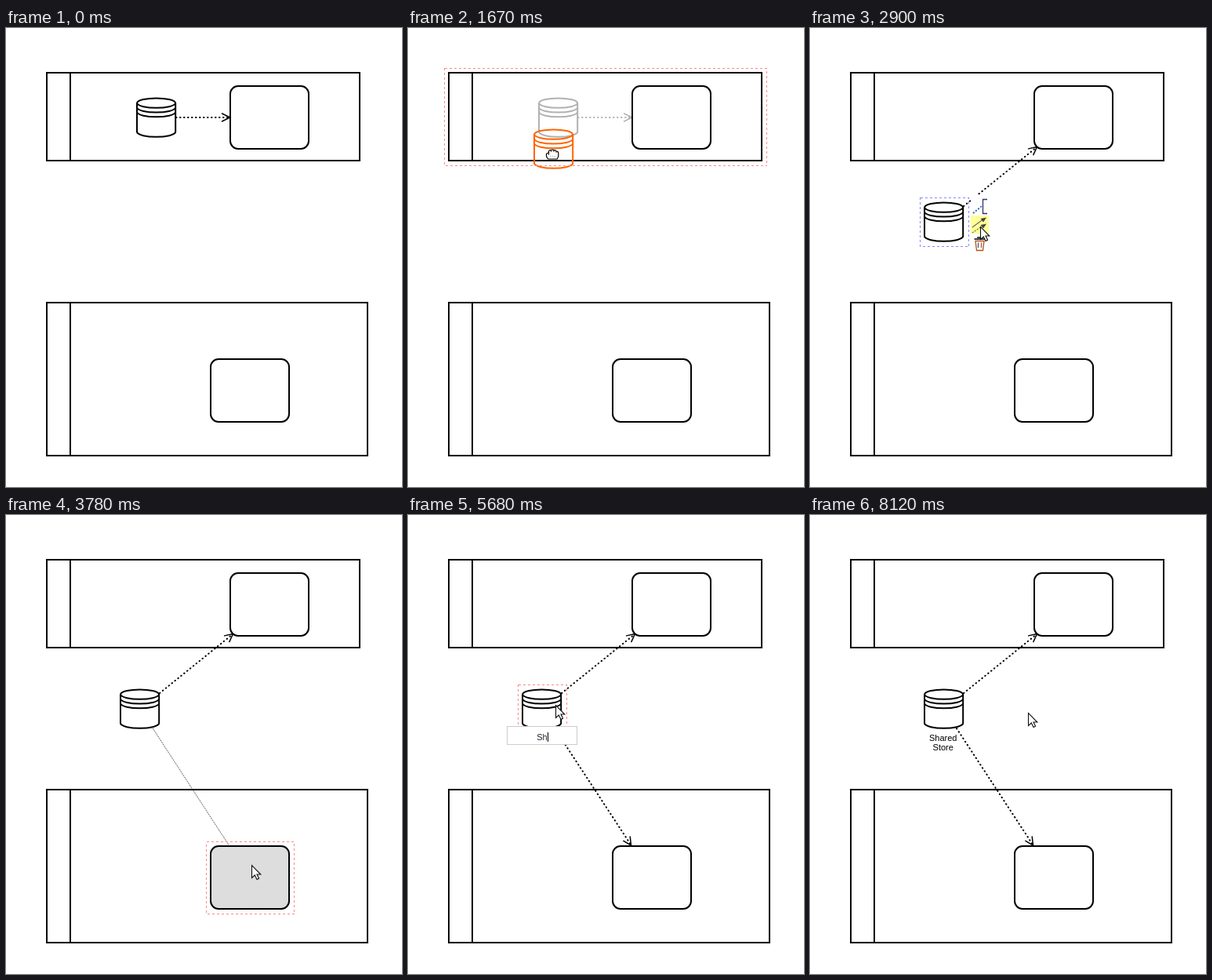
Animation, 505 px wide and 585 px high, one loop 9730 ms. Source, as an HTML page:

```html
<!DOCTYPE html>
<html lang="en">
<head>
<meta charset="utf-8">
<title>Shared data store</title>
<style>
  html, body { margin: 0; width: 100%; height: 100%; overflow: hidden; background: #fff; }
  svg { display: block; width: 505px; height: 585px; }
  .shape { fill: #fff; stroke: #000; stroke-width: 2; }
  .ok { fill: #ddd; }
  .flow { fill: none; stroke: #000; stroke-width: 2; stroke-linecap: round; stroke-dasharray: .5 4.5; }
  .head { fill: none; stroke: #000; stroke-width: 1.5; stroke-linecap: round; stroke-linejoin: round; }
  .outline { fill: none; stroke: #88f; stroke-dasharray: 3 3; shape-rendering: crispEdges; }
  .hover { stroke: #f88; }
  .ghost { opacity: .3; }
  .drag { fill: none; stroke: #ff6400; }
  .preview { stroke: #222; stroke-width: 1; stroke-dasharray: 1 1; }
  .icon { fill: none; stroke: #333; stroke-width: 1.3; }
  text { font: 11px "Liberation Sans", Arial, sans-serif; text-anchor: middle; fill: #000; }
  #editor text { fill: #223; }
</style>
</head>
<body>
<svg viewBox="0 0 505 585">
  <defs>
    <path id="storePath" d="M0 6.65v36.9c1.64 8.2 47.54 8.2 49.18 0v-36.9c-1.64-8.2-47.54-8.2-49.18 0c1.64 8.2 47.54 8.2 49.18 0m-49.18 5.74c1.64 8.2 47.54 8.2 49.18 0m-49.18 5.74c1.64 8.2 47.54 8.2 49.18 0"/>
    <path id="headPath" d="M-10-5L0 0L-10 5"/>
    <g id="note" class="icon">
      <path d="M21 2.5H15.500V20.500H21" stroke="#336"/>
      <path d="M3 20L14 11" stroke="#1565b0" stroke-width="1.8" stroke-dasharray="2 2"/>
    </g>
    <g id="connect" class="icon">
      <path d="M2 15L17 4" stroke-width="1"/>
      <path d="M2 22L17 12" stroke-width="1" stroke-dasharray="2 1.500"/>
      <path d="M20 2.500L12.500 4L16 8.500ZM20 10.500L12.500 12L16 16.500Z" fill="#444" stroke="none"/>
    </g>
    <g id="trash" class="icon">
      <path d="M4.500 7H18.500M9 6V5H14V6" stroke="#444" stroke-width="1.800"/>
      <path d="M6 9.500L7.500 21.500H15.500L17 9.500Z" stroke="#b5531c"/>
      <path d="M9.500 11.500V18" stroke="#27609c"/><path d="M13.500 11.500V18" stroke="#c4561c"/>
    </g>
    <circle id="event" class="icon" cx="11.5" cy="11.5" r="8"/>
    <path id="gateway" class="icon" d="M11.500 2L21 11.500L11.500 21L2 11.500Z"/>
    <rect id="box" class="icon" x="2.5" y="4.500" width="18" height="14" rx="3"/>
  </defs>

  <g class="shape">
    <rect x="52" y="57" width="399" height="112"/><path d="M82 57V169"/>
    <rect x="52" y="350" width="409" height="195"/><path d="M82 350V545"/>
    <rect x="286" y="74" width="100" height="80" rx="10"/>
    <rect id="task" x="261" y="422" width="100" height="80" rx="10"/>
  </g>

  <g id="before">
    <use href="#storePath" class="shape" x="167" y="89"/>
    <path class="flow" d="M217 114H285"/>
    <use href="#headPath" class="head" transform="translate(285.5 114)"/>
  </g>
  <g id="after">
    <use href="#storePath" class="shape" x="146" y="222"/>
    <path class="flow" d="M196 227L289 152"/>
    <use href="#headPath" class="head" transform="translate(289.5 151.500) rotate(-38.900)"/>
  </g>
  <g id="link">
    <path class="flow" d="M187 272L284 420"/>
    <use href="#headPath" class="head" transform="translate(284.500 421) rotate(56.800)"/>
  </g>
  <line id="preview" class="preview"/>
  <use id="dragger" href="#storePath" class="shape drag"/>
  <g id="label"><text x="169.700" y="288">Shared</text><text x="169.700" y="300">Store</text></g>

  <rect id="selected" class="outline"/>
  <rect id="hovered" class="outline hover"/>

  <g id="storePad">
    <path d="M205 213H228V285H205Z" fill="#fff"/>
    <rect id="glow" x="205" width="23" height="23" fill="#ff9"/>
    <use href="#note" x="205" y="216"/>
    <use href="#connect" x="205" y="239"/>
    <use href="#trash" x="205" y="262"/>
  </g>
  <g id="taskPad">
    <use href="#event" x="370" y="416"/><use href="#gateway" x="393" y="416"/><use href="#box" x="416" y="416"/>
    <use href="#event" x="370" y="439"/><use href="#note" x="393" y="439"/><use href="#connect" x="416" y="439"/>
    <use href="#trash" x="370" y="462"/>
  </g>

  <g id="editor">
    <rect id="field" x="126.500" y="269.500" width="89" fill="#fff" stroke="#ccc"/>
    <text id="line0" x="171" y="287"></text>
    <text id="line1" x="171" y="300"></text>
    <rect id="caret" width="1" height="12"/>
  </g>

  <path id="arrow" d="M.5 .5V16.500L4.300 13L7 18.500L9.600 17.300L7 12H11.800Z" fill="#fff" stroke="#111" stroke-width="1.100"/>
  <g id="hand" fill="#fff" stroke="#000" stroke-width="1.200">
    <path d="M-5 6Q-8 4-7.500 0Q-7-2-4.500-1.500V-4Q-3.500-6-1.500-5Q0-7 2-5Q4-6 5-4Q8-4 7.800-1V2Q7.500 4.500 6 6Z"/>
    <path d="M-1.500-5V-3M2-5V-3M5-4V-2M-4.500-1V1" stroke-width=".8"/>
    <path d="M-3 2.500H5" stroke="#888" stroke-width=".8" stroke-dasharray="1 1.500"/>
  </g>
</svg>
<script>
const LOOP = 9730;
const $ = id => document.getElementById(id);
const show = (id, on) => { $(id).style.display = on ? "" : "none"; };
const set = (id, attrs) => { for (const k in attrs) $(id).setAttribute(k, attrs[k]); };

const store0 = { x: 167, y: 89, w: 50, h: 50 };
const store1 = { x: 146, y: 222, w: 50, h: 50 };
const task0 = { x: 286, y: 74, w: 100, h: 80 };
const task1 = { x: 261, y: 422, w: 100, h: 80 };
const pool0 = { x: 52, y: 57, w: 399, h: 112 };
const pool1 = { x: 52, y: 350, w: 409, h: 195 };

// Cursor moves: start, end, number of steps, points as [progress, x, y]
const moves = [
  [660, 1420, 19, [[0, 321, 287], [.632, 203, 148], [1, 190, 121]]],
  [1590, 1950, 10, [[0, 190, 121], [1, 169, 254]]],
  [2220, 2900, 17, [[0, 169, 254], [.4, 192, 278], [.8, 219, 266], [1, 217, 253]]],
  [3260, 4100, 20, [[0, 217, 253], [.6, 313, 446], [.65, 313, 446], [1, 188, 242]]],
  [8000, 8120, 4, [[0, 188, 242], [1, 278, 252]]]
];

const typing = [
  [5100, "S"], [5680, "Sh"], [5830, "Sha"], [5900, "Shar"], [6040, "Share"], [6190, "Shared"],
  [6410, "Shared\n"], [6630, "Shared\nS"], [6710, "Shared\nSt"],
  [6930, "Shared\nSto"], [7020, "Shared\nStor"], [7110, "Shared\nStore"]
];

function cursorAt(t) {
  const move = moves.filter(m => t >= m[0]).pop();
  if (!move) return { x: 321, y: 287 };
  const [a, b, n, pts] = move;
  const p = t >= b ? 1 : (Math.floor((t - a) / (b - a) * (n - 1)) + 1) / n;
  const i = Math.max(1, pts.findIndex(q => q[0] >= p));
  const [p0, x0, y0] = pts[i - 1], [p1, x1, y1] = pts[i];
  const f = (p - p0) / (p1 - p0);
  return { x: Math.round(x0 + (x1 - x0) * f), y: Math.round(y0 + (y1 - y0) * f) };
}

const inside = (c, r) => c.x >= r.x && c.x <= r.x + r.w && c.y >= r.y && c.y <= r.y + r.h;
const center = r => ({ x: r.x + r.w / 2, y: r.y + r.h / 2 });

function outline(id, r) {
  show(id, r);
  if (r) set(id, { x: r.x - 5.5, y: r.y - 5.5, width: r.w + 12, height: r.h + 12 });
}

// Point where the ray from the middle of r towards p leaves r
function edge(r, p) {
  const c = center(r), dx = p.x - c.x, dy = p.y - c.y;
  const k = Math.min(r.w / 2 / Math.abs(dx || 1e-6), r.h / 2 / Math.abs(dy || 1e-6));
  return { x: c.x + dx * k, y: c.y + dy * k };
}

function drawEditor(t) {
  const key = typing.filter(k => t >= k[0]).pop();
  const lines = (key ? key[1] : "").split("\n");
  const last = lines.length - 1;
  $("line0").textContent = lines[0];
  $("line1").textContent = lines[1] || "";
  set("field", { height: last ? 36 : key ? 23 : 22 });
  const width = lines[last] ? $("line" + last).getComputedTextLength() : 0;
  set("caret", { x: Math.round(171 + width / 2), y: 277 + 13 * last });
  show("caret", t >= 4590);
}

function draw(t) {
  const between = (a, b) => t >= a && t < b;
  const c = cursorAt(t);
  const dragging = between(1590, 2220), moved = t >= 2220;
  const linking = between(3260, 3836), editing = between(4510, 7210);

  show("before", !moved);
  $("before").setAttribute("class", dragging ? "ghost" : "");
  show("after", moved);
  show("link", t >= 3836);
  show("label", t >= 7210);

  show("dragger", dragging);
  set("dragger", { x: 146 + c.x - 169, y: 222 + c.y - 254 });

  const onTask = linking && inside(c, task1);
  $("task").setAttribute("class", onTask ? "ok" : "");
  show("preview", linking);
  if (linking) {
    const goal = onTask ? center(task1) : c;
    const from = edge(store1, goal);
    const to = onTask ? edge(task1, center(store1)) : c;
    set("preview", { x1: from.x, y1: from.y, x2: to.x, y2: to.y });
  }

  const targets = [task0, task1, pool0, pool1];
  if (!dragging) targets.unshift(moved ? store1 : store0);
  const hover = t >= 660 && targets.find(r => inside(c, r));
  const selected = between(2220, 3260) || between(4360, 4510) ? store1
    : between(3836, 4360) ? task1 : null;
  outline("hovered", hover);
  outline("selected", selected !== hover && selected);

  show("storePad", between(2220, 3260) || between(4360, 4590));
  show("taskPad", between(3836, 4360));
  const row = Math.floor((c.y - 216) / 23);
  show("glow", c.x >= 205 && c.x < 228 && row >= 0 && row < 3);
  set("glow", { y: 216 + 23 * row });

  show("editor", editing);
  if (editing) drawEditor(t);

  show("arrow", t >= 270 && !dragging);
  show("hand", dragging);
  const place = `translate(${c.x} ${c.y})`;
  set("arrow", { transform: place });
  set("hand", { transform: place });
}

const start = performance.now();
function frame() {
  draw((performance.now() - start) % LOOP);
  requestAnimationFrame(frame);
}
frame();
</script>
</body>
</html>
```
